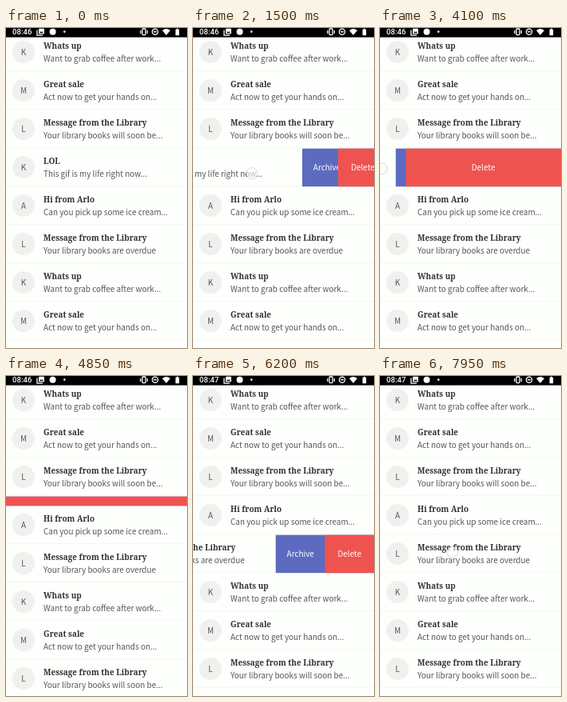
These frames come from a looping animation (227 px wide and 400 px high, 8000 ms). An HTML page:

```html
<!DOCTYPE html>
<html lang="en">
<head>
<meta charset="utf-8">
<title>Swipeable inbox</title>
<style>
  html, body { margin: 0; width: 100%; height: 100%; overflow: hidden; background: #fdfffc; }
  #stage { display: block; width: 100vw; height: 100vh; }
  text { font: 9.95px "Noto Sans CJK JP", "Noto Sans CJK SC", "Noto Sans CJK", "Noto Sans", sans-serif; fill: #555; }
  .title { font: bold 9.95px "Noto Serif", "Liberation Serif", serif; fill: #303030; }
  .mid { text-anchor: middle; }
  .action { fill: #fff; text-anchor: middle; }
  .avatar { fill: #f0f1ef; }
  .rule { fill: #f1f3f0; }
  #clock { font: 500 9.6px Roboto, "Open Sans", sans-serif; fill: #fff; }
  .line { fill: none; stroke: #fff; stroke-width: 1.3; }
  #touch circle { fill: #fff; fill-opacity: .6; stroke: #8f90b4; stroke-opacity: .4; stroke-width: .9; }
</style>
</head>
<body>
<svg id="stage" viewBox="0 0 227 400">
  <rect width="227" height="400" fill="#fdfffc"/>
  <g id="list"></g>
  <g id="bar">
    <rect width="227" height="11.6"/>
    <text id="clock" x="8" y="8.4">08:46</text>
    <g fill="#fff">
      <rect x="41" y=".8" width="7" height="6.6" rx=".8"/>
      <path d="M39 2.500V9.200H46" class="line"/>
      <path d="M42 6.300l1.500-2 1 1 1-1 1.500 2z" fill="#000"/>
      <circle cx="58.600" cy="4.800" r="4"/>
      <circle cx="73.300" cy="4.600" r="1.300"/>
      <rect x="171" y="1" width="4" height="7.600" rx=".8" class="line"/>
      <path d="M168.800 3v4M177.200 3v4" class="line"/>
      <circle cx="187" cy="4.800" r="3.600" class="line"/>
      <path d="M185 4.800h4" class="line"/>
      <path d="M196 3Q201 -1 206 3L201 9z"/>
      <path d="M212.600 1.700h1.300v-1h2v1h1.300v7.500h-4.600z"/>
    </g>
  </g>
  <g id="touch"><circle r="7"/></g>
</svg>
<script>
const W = 227, ROW = 48, TOP = 6.4, LOOP = 8000;
const OPEN = 124, MIN_LABEL = 31;
const $ = id => document.getElementById(id);

function add(parent, tag, attrs, text) {
  const el = document.createElementNS("http://www.w3.org/2000/svg", tag);
  set(el, attrs);
  if (text) el.textContent = text;
  return parent.appendChild(el);
}
function set(el, attrs) {
  for (const k in attrs) el.setAttribute(k, attrs[k]);
}

const progress = (t, from, to) => Math.min(1, Math.max(0, (t - from) / (to - from)));
const mix = (a, b, u) => a + (b - a) * u;
const easeOut = (u, power) => 1 - (1 - u) ** power;
function ease(t, from, to) {
  const u = progress(t, from, to);
  return u * u * (3 - 2 * u);
}
// Exponential approach to a resting place
const settle = (dt, from, to, tau) => mix(to, from, Math.exp(-dt / tau));

const coffee = ["K", "Whats up", "Want to grab coffee after work..."];
const sale = ["M", "Great sale", "Act now to get your hands on..."];
const soon = ["L", "Message from the Library", "Your library books will soon be..."];
const lol = ["K", "LOL", "This gif is my life right now..."];
const hi = ["A", "Hi from Arlo", "Can you pick up some ice cream..."];
const due = ["L", "Message from the Library", "Your library books are overdue"];
const mails = [coffee, sale, soon, lol, hi, due, coffee, sale, soon, lol];
const first = mails.indexOf(lol), second = mails.indexOf(due);

function makeRow([letter, title, body], i) {
  const box = add($("list"), "svg", { y: TOP + i * ROW, width: W, height: ROW });
  const content = add(box, "g", {});
  add(content, "circle", { cx: 22, cy: 23.7, r: 14, class: "avatar" });
  add(content, "text", { x: 22, y: 27.4, class: "mid" }, letter);
  add(content, "text", { x: 47, y: 19.4, class: "title" }, title);
  add(content, "text", { x: 47, y: 35.4 }, body);
  add(content, "rect", { y: 47, width: W, height: 1, class: "rule" });
  const row = { box, content };
  if (i === first || i === second) {
    row.archive = makeAction(box, "Archive", "#5c6bc0");
    row.remove = makeAction(box, "Delete", "#ef5350");
  }
  return row;
}

function makeAction(box, label, fill) {
  return {
    rect: add(box, "rect", { height: ROW, fill }),
    label: add(box, "text", { y: 27.3, class: "action" }, label)
  };
}

function placeAction(action, left, width) {
  set(action.rect, { x: left, width: W - left });
  set(action.label, { x: left + Math.max(MIN_LABEL, width / 2) });
}

// d: distance swiped, full: how far Delete has grown over Archive
function swipe(row, d, full) {
  const grown = d * mix(.5, 1, full);
  set(row.content, { transform: `translate(${-d} 0)` });
  placeAction(row.archive, W - d, d - grown);
  placeAction(row.remove, W - grown, grown);
}

function firstSwipe(t) {
  if (t < 2600) {
    const sway = 10 * (1 - Math.cos(2 * Math.PI * progress(t, 1500, 2600)));
    return 90 * ease(t, 410, 1350) - sway;
  }
  if (t < 3880) return settle(t - 2600, 90, OPEN, 103);
  if (t < 4100) return mix(OPEN, 207, ease(t, 3880, 4100));
  return settle(t - 4100, 207, W, 80);
}

function secondSwipe(t) {
  if (t < 6000) return 95 * ease(t, 5720, 6000);
  if (t < 6550) return settle(t - 6000, 95, OPEN, 55);
  if (t < 7150) return mix(OPEN, 30, ease(t, 6550, 7150));
  return settle(t - 7150, 30, 0, 80);
}

// The finger follows its row: x = origin - swipe
const press = (start, end, origin, y0, y1, drag) => ({ start, end, origin, y0, y1, drag });
const presses = [
  press(410, 2600, 164, 226, 181, firstSwipe),
  press(3880, 4100, 209, 177, 176, firstSwipe),
  press(5720, 6000, 153, 224, 222, secondSwipe),
  press(6550, 7150, 204, 222, 222, secondSwipe),
  press(7890, 7960, 91, 232, 220, secondSwipe)
];

function drawTouch(t) {
  const p = presses.findLast(q => t >= q.start) || presses[0];
  const held = Math.min(p.end, Math.max(p.start, t));
  const x = p.origin - p.drag(held - .001);
  const y = mix(p.y0, p.y1, easeOut(progress(t, p.start, p.end), 6));
  const opacity = progress(t, p.start, p.start + 50) * (1 - progress(t, p.end, p.end + 180));
  set($("touch"), { transform: `translate(${x} ${y})`, opacity });
}

function draw(t) {
  const gone = easeOut(progress(t, 4680, 5080), 2.5);
  const height = ROW * (1 - gone);
  rows.forEach(({ box }, i) => {
    if (i > first) set(box, { y: TOP + (i - gone) * ROW });
  });
  set(rows[first].box, { height, visibility: gone < 1 ? "visible" : "hidden" });

  swipe(rows[first], firstSwipe(t), ease(t, 3960, 4140));
  swipe(rows[second], secondSwipe(t), 0);
  drawTouch(t);
  $("clock").textContent = t < 5850 ? "08:46" : "08:47";
}

const rows = mails.map(makeRow);
const begin = performance.now();
function tick() {
  draw((performance.now() - begin) % LOOP);
  requestAnimationFrame(tick);
}
tick();
</script>
</body>
</html>
```
